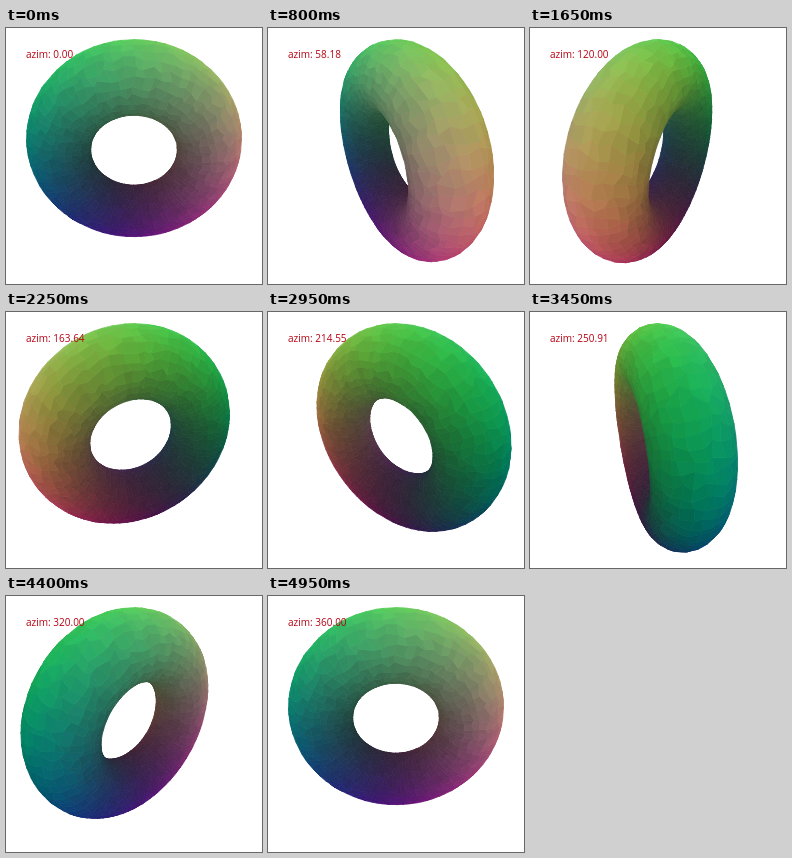
An HTML page with a canvas that plays this animation: 256 px wide and 256 px high, repeating every 5000 ms.

```html
<!DOCTYPE html>
<html>
<head>
<meta charset="utf-8">
<style>
html, body { margin: 0; overflow: hidden; background: #fff; }
canvas { display: block; }
</style>
</head>
<body>
<canvas id="stage" width="256" height="256"></canvas>
<script>
const ctx = document.getElementById('stage').getContext('2d');
const TAU = 2 * Math.PI;
const RING = 1, TUBE = 0.4, OUTER = RING + TUBE;
const COLS = 80, ROWS = 28;
const FRAMES = 100, FRAME_MS = 50;

// The camera circles level with the top of the torus and looks at its centre.
const CAM_DIST = 2.5, CAM_HEIGHT = OUTER;
const pitch = Math.atan2(CAM_HEIGHT, CAM_DIST);
const focal = 116.4 / Math.tan(pitch);

let seed = 7;
const random = () => (seed = seed * 16807 % 2147483647) / 2147483647;
const jitter = amount => (random() - 0.5) * amount;

function surface(ringAngle, tubeAngle) {
  const rad = RING + TUBE * Math.cos(tubeAngle);
  return [rad * Math.cos(ringAngle), TUBE * Math.sin(tubeAngle), rad * Math.sin(ringAngle)];
}

// Colour follows position, darker towards the hole.
function colour([x, y, z], tubeAngle) {
  const shade = 0.8 + 0.2 * Math.cos(tubeAngle) + jitter(0.05);
  const rgb = [94 + 68 * x, 104 + 72 * z, 98 + 70 * y - 8 * z];
  return `rgb(${rgb.map(c => Math.max(0, Math.round(c * shade)))})`;
}

const vertices = [];
for (let i = 0; i < COLS; i++)
  for (let j = 0; j < ROWS; j++)
    vertices.push(surface((i + jitter(0.7)) / COLS * TAU, (j + jitter(0.7)) / ROWS * TAU));

const faces = [];
const index = (i, j) => (i % COLS) * ROWS + j % ROWS;
for (let i = 0; i < COLS; i++)
  for (let j = 0; j < ROWS; j++) {
    const tubeAngle = (j + 0.5) / ROWS * TAU;
    const middle = surface((i + 0.5) / COLS * TAU, tubeAngle);
    faces.push({
      corners: [index(i, j), index(i + 1, j), index(i + 1, j + 1), index(i, j + 1)],
      fill: colour(middle, tubeAngle)
    });
  }

function project([x, y, z], azim) {
  const c = Math.cos(azim), s = Math.sin(azim);
  const ahead = CAM_DIST - x * s - y * c, above = z - CAM_HEIGHT;
  const depth = ahead * Math.cos(pitch) - above * Math.sin(pitch);
  const up = ahead * Math.sin(pitch) + above * Math.cos(pitch);
  return [128 + focal * (x * c - y * s) / depth, 128 - focal * up / depth, depth];
}

function draw(degrees) {
  const points = vertices.map(v => project(v, degrees * TAU / 360));
  const depth = face => face.corners.reduce((sum, k) => sum + points[k][2], 0);
  const visible = faces.filter(({ corners }) => {
    const [a, b, c, d] = corners.map(k => points[k]);
    return (c[0] - a[0]) * (d[1] - b[1]) - (c[1] - a[1]) * (d[0] - b[0]) < 0;
  }).map(face => [depth(face), face]).sort((p, q) => q[0] - p[0]);

  ctx.fillStyle = '#fff';
  ctx.fillRect(0, 0, 256, 256);
  ctx.lineWidth = 0.8;
  ctx.lineJoin = 'round';
  for (const [, face] of visible) {
    ctx.fillStyle = ctx.strokeStyle = face.fill;
    ctx.beginPath();
    for (const k of face.corners) ctx.lineTo(points[k][0], points[k][1]);
    ctx.closePath();
    ctx.fill();
    ctx.stroke();
  }

  ctx.fillStyle = '#b80012';
  ctx.font = '10px "Open Sans", sans-serif';
  ctx.fillText('azim: ' + degrees.toFixed(2), 20, 30);
}

let shown = -1;
function tick() {
  const step = Math.floor(performance.now() / FRAME_MS) % FRAMES;
  if (step !== shown) draw(step * 360 / (FRAMES - 1));
  shown = step;
  requestAnimationFrame(tick);
}
tick();
</script>
</body>
</html>
```
